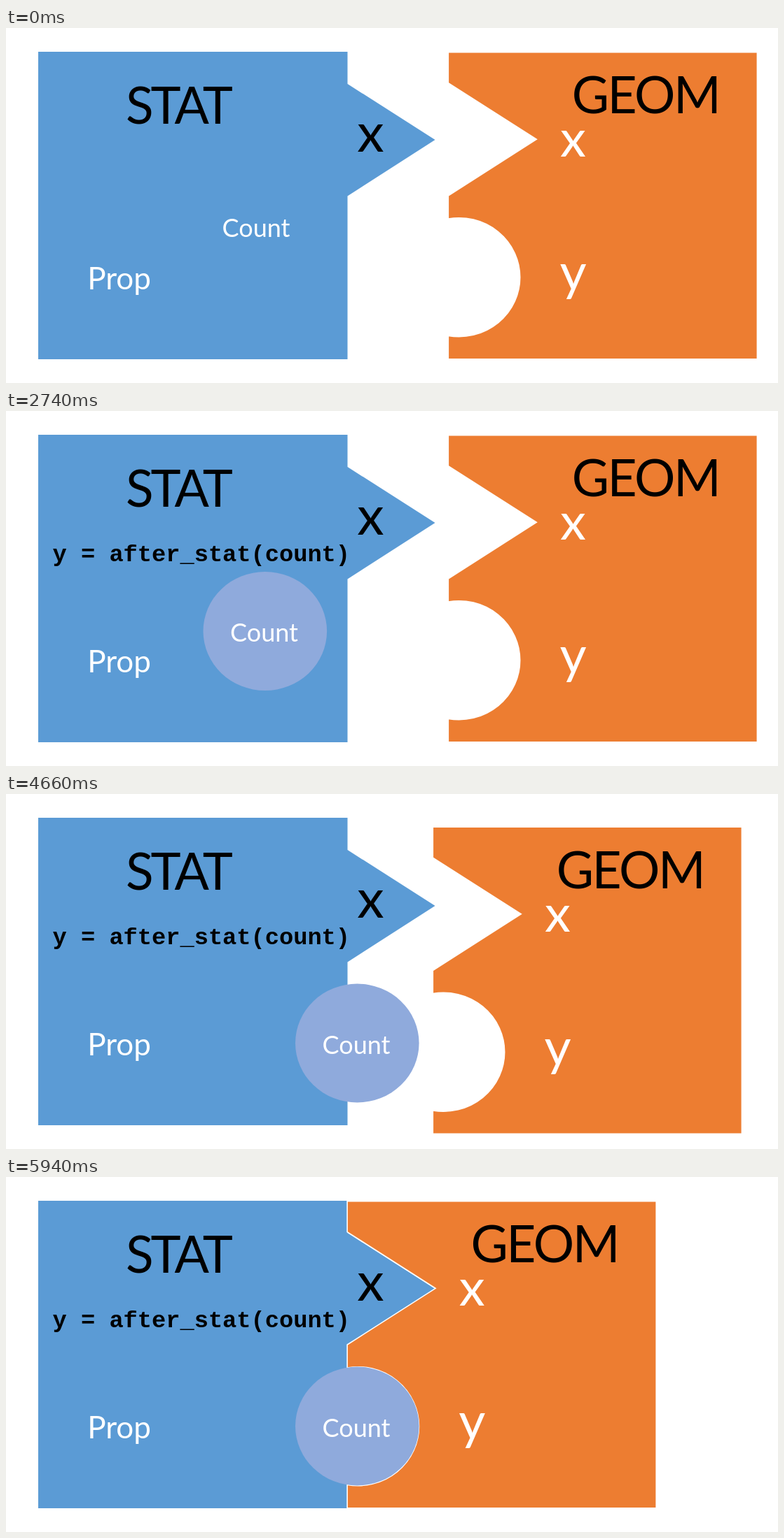
Write an HTML page that moves like this. It is 1102 by 508 pixels and loops after 6020 ms.

```html
<!DOCTYPE html>
<html lang="en">
<head>
<meta charset="utf-8">
<title>Stat and geom</title>
<style>
  html, body { margin: 0; width: 100%; height: 100%; overflow: hidden; background: #fff; }
  svg { display: block; width: 100%; height: 100%; }
  text { font-family: Lato, sans-serif; text-anchor: middle; }
  .white { fill: #fff; }
  .title { font-size: 73px; }
  .axis { font-size: 74px; }
  .code { font: bold 33.7px "Courier New", "Liberation Mono", monospace; }
</style>
</head>
<body>
<svg viewBox="0 0 1102 508">
  <path fill="#5b9bd5" d="M46 34H487.5V80L612.5 160L487.5 240.5V474H46Z"/>
  <text class="title" x="245.5" y="136.5" letter-spacing="-4">STAT</text>
  <text x="520.5" y="177" font-size="77">x</text>
  <text class="white" x="161.5" y="374" font-size="44">Prop</text>
  <g id="geom">
    <path fill="#ed7d31" stroke="#fff" stroke-width="1.6"
      d="M631.3 34.6H1072.4V473.8H631.3V440.4A87.2 85 0 1 0 631.3 273V240L757.3 159.3L631.3 78.6Z"/>
    <text class="title" x="913" y="122" letter-spacing="-2.5">GEOM</text>
    <text class="axis white" x="809.5" y="184">x</text>
    <text class="axis white" x="809.5" y="375">y</text>
  </g>
  <g id="count">
    <ellipse id="disk" cx="358.3" cy="284" rx="88.3" ry="85" fill="#8faadc"/>
    <text class="white" x="357" y="299" font-size="36">Count</text>
  </g>
  <text class="code" id="code" x="278.8" y="214.5">y = after_stat(count)</text>
</svg>
<script>
const LOOP = 6020, STEP = 40, MOVE = 1920;
const REVEAL = 1050, COUNT_START = 2100, GEOM_START = 4020;
const [count, disk, code, geom] =
  ["count", "disk", "code", "geom"].map(id => document.getElementById(id));

// Constant acceleration, then constant deceleration, in fixed steps.
function progress(time, start) {
  const elapsed = Math.floor((time - start) / STEP) * STEP;
  const u = Math.min(1, Math.max(0, elapsed / MOVE));
  return u < 0.5 ? 2 * u * u : 1 - 2 * (1 - u) ** 2;
}

// Cubic Bezier coordinate that starts at zero.
const bezier = (s, a, b, end) =>
  3 * (1 - s) ** 2 * s * a + 3 * (1 - s) * s * s * b + s ** 3 * end;

const countPath = s => [
  bezier(s, 7.1, 61.3, 143),
  bezier(s, 42.1, 114.9, 72.5) + 650 * s * (1 - s) * (s - 0.222) * (0.749 - s)
];

const geomPath = s => [
  -bezier(s, 21.2, 103.2, 144.2),
  21.3 * Math.max(0, Math.sin(Math.PI * s ** 0.8)) ** 2.5
];

const move = (part, [x, y]) => part.setAttribute("transform", `translate(${x} ${y})`);

function draw() {
  const time = performance.now() % LOOP;
  const visibility = time < REVEAL ? "hidden" : "visible";
  disk.setAttribute("visibility", visibility);
  code.setAttribute("visibility", visibility);
  move(count, countPath(progress(time, COUNT_START)));
  move(geom, geomPath(progress(time, GEOM_START)));
  requestAnimationFrame(draw);
}
draw();
</script>
</body>
</html>
```
